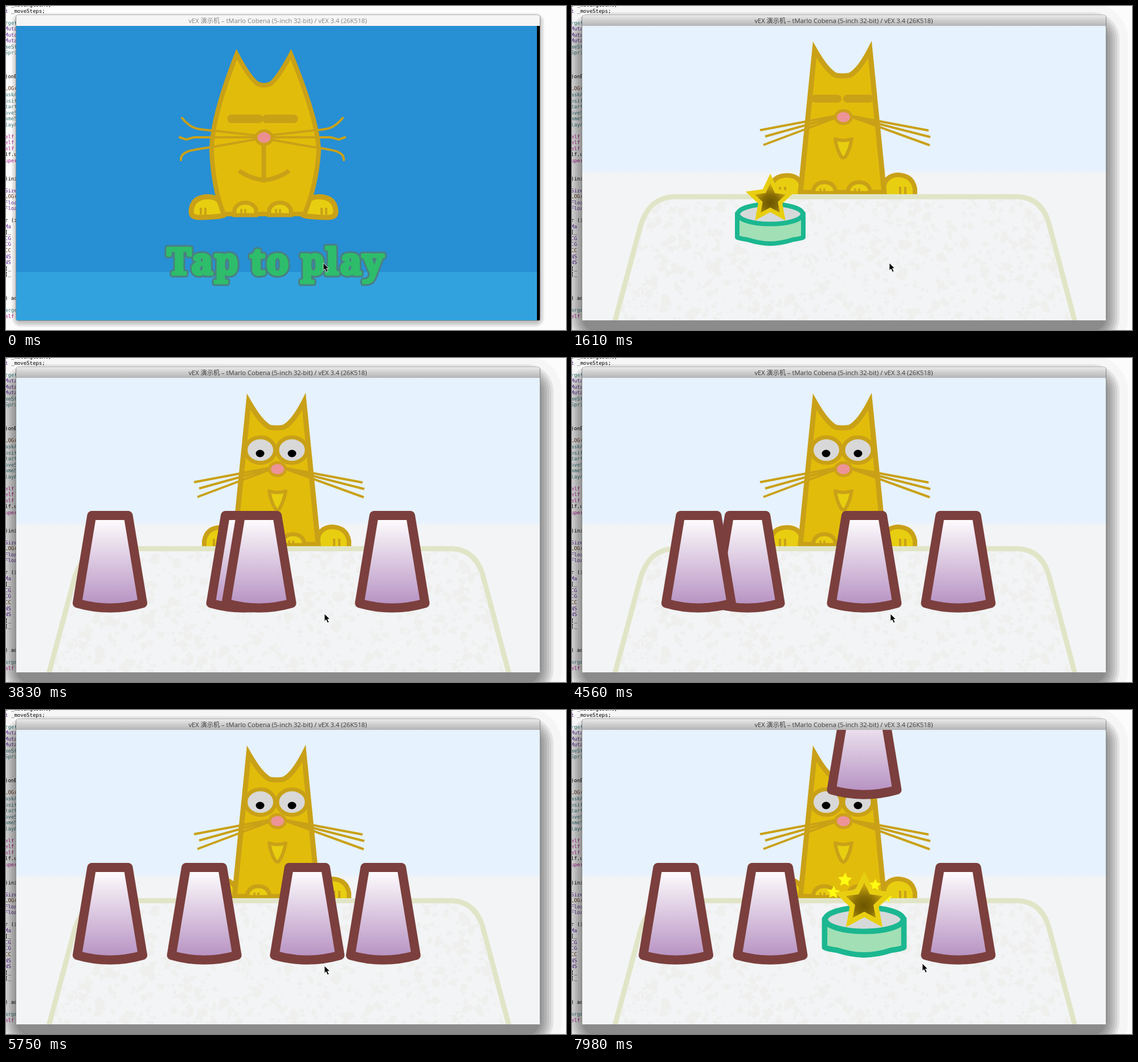
An HTML page for the animation above (8000 ms loop, 983 by 570 pixels).

```html
<!DOCTYPE html>
<html lang="en">
<head>
<meta charset="utf-8">
<title>Cup shuffle</title>
<style>
html, body { margin: 0; width: 100%; height: 100%; overflow: hidden; background: #fcfcfc; }
svg { display: block; width: 983px; height: 570px; }
.code { font: 9px "DejaVu Sans Mono", monospace; white-space: pre; }
.bar { font: 11.2px "Open Sans", "Noto Sans CJK SC", "Noto Sans CJK", sans-serif; text-anchor: middle; }
.tap { font: 900 64px "Noto Serif", serif; letter-spacing: 2.4px; text-anchor: middle; stroke-linejoin: round; }
.line { fill: none; stroke: #c9a117; }
.body { fill: #e2bc0b; stroke: #c9a117; }
.paw { fill: #e8ce10; stroke: #c9a117; }
.dish { stroke: #1bb790; stroke-width: 8; stroke-linejoin: round; }
</style>
</head>
<body>
<svg viewBox="0 0 983 570">
  <defs>
    <clipPath id="view"><rect x="18" y="35" width="919" height="518"/></clipPath>
    <clipPath id="top"><rect x="300" y="35" width="360" height="296"/></clipPath>
    <clipPath id="desk"><path d="M80 553 L123 392 Q136 341 180 340 H782 Q824 342 835 390 L878 553Z"/></clipPath>
    <linearGradient id="sky" x2="0" y2="1">
      <stop offset=".966" stop-color="#e6f2fe"/><stop offset="1" stop-color="#f3f4f5"/>
    </linearGradient>
    <linearGradient id="chrome" x2="0" y2="1">
      <stop stop-color="#e9e9e9"/><stop offset="1" stop-color="#b4b4b4"/>
    </linearGradient>
    <linearGradient id="glass" gradientUnits="userSpaceOnUse" x1="0" y1="285" x2="0" y2="430">
      <stop stop-color="#fdfbfd"/><stop offset="1" stop-color="#b995c4"/>
    </linearGradient>
    <radialGradient id="gold" gradientUnits="userSpaceOnUse" cx="0" cy="346" r="30">
      <stop stop-color="#6b5500"/><stop offset=".45" stop-color="#856b04"/><stop offset="1" stop-color="#c9a60d"/>
    </radialGradient>
    <g id="cup">
      <path d="M-32 277 H32 L57.5 431.5 Q0 448 -57.5 431.5Z" fill="url(#glass)"
        stroke="#7b3f3d" stroke-width="16" stroke-linejoin="round"/>
    </g>
    <g id="titleSide">
      <path class="paw" stroke-width="9" d="M325 362 Q326 336 355 335.5 Q374 336 380 352 L384 367 Q382 371 340 372 Q325 372 325 362Z"/>
      <path class="line" stroke-width="4" d="M342 355 V367 M350 355 V367"/>
    </g>
    <g id="whisker">
      <path class="line" stroke-width="4" stroke-linecap="round" d="M442 228 L362 219 C338 217 326 218 309 197
        M442 231 L330 231 L316 235 L305 231 M442 234 L362 248 C330 253 306 254 307 271"/>
    </g>
  </defs>
  <rect width="983" height="570" fill="#fcfcfc"/>
  <g id="code" class="code"></g>
  <g id="dimShadow"></g>
  <g id="deepShadow"></g>
  <rect x="17.5" y="16" width="920" height="537.5" rx="4" fill="#f3f4f5" stroke="#8a8a8a"/>
  <path id="bar" d="M18 35 V20 Q18 16 22 16 H933 Q937 16 937 20 V35Z"/>
  <text id="barText" class="bar" x="477" y="30">vEX 演示机 – tMarlo Cobena (5-inch 32-bit) / vEX 3.4 (26K518)</text>

  <g id="title" clip-path="url(#view)">
    <rect x="18" y="35" width="919" height="518"/>
    <rect x="18" y="35" width="914" height="433" fill="#278fd4"/>
    <rect x="18" y="468" width="914" height="85" fill="#31a2de"/>
    <use href="#titleSide"/>
    <use href="#titleSide" transform="matrix(-1 0 0 1 904 0)"/>
    <path class="body" stroke-width="8" stroke-miterlimit="9" d="M405 85 Q361 197 361 255 Q364 320 382 366 H524
      Q545 315 549 255 Q547 199 500 85 Q480 123 466 136 Q453 143 440 136 Q425 123 405 85Z"/>
    <use href="#whisker"/>
    <use href="#whisker" transform="matrix(-1 0 0 1 900 0)"/>
    <g id="titlePaws"></g>
    <path class="line" stroke-width="15" stroke-linecap="round" d="M396 198.500 H444 M457 198.500 H505"/>
    <path class="line" stroke-width="8" d="M452.500 236 V307 M409 290 Q430 304 453 306.500 Q477 304 497 290"/>
    <ellipse cx="453" cy="231.500" rx="14" ry="12" fill="#ec8f93" stroke="#c9a117" stroke-width="5"/>
    <text class="tap" x="474" y="472" fill="none" stroke="#4b7f82" stroke-width="11">Tap to play</text>
    <text class="tap" x="474" y="472" fill="#2ebd6b" stroke="#2ebd6b" stroke-width="5">Tap to play</text>
  </g>

  <g id="game" clip-path="url(#view)">
    <rect x="18" y="35" width="919" height="518" fill="#f3f4f5"/>
    <rect x="18" y="35" width="919" height="261" fill="url(#sky)"/>
    <g clip-path="url(#top)">
      <path class="paw" stroke-width="8" d="M348 335 V322 Q352 298 378 298 Q402 298 406 325 V335 M602 335 V322 Q598 298 572 297 Q548 298 546 325 V335"/>
      <path class="line" stroke-width="4" d="M365 318 V331 M374 318 V331 M576 318 V331 M585 318 V331"/>
      <path class="body" stroke-width="9" stroke-miterlimit="9" d="M401 328 L426 77 Q447 114 463 122 Q475 124 487 122 Q504 114 523 77 L548 328Z"/>
      <path class="line" stroke-width="4" d="M470 192 L330 218.500 M470 193 L339 229.500 M470 194 L336 244.500
        M482 192 L626 219 M482 193 L629 230.500 M482 192 L628 245"/>
      <g id="gamePaws"></g>
      <g id="open">
        <g fill="#d8d8d8" stroke="#c9a117" stroke-width="7">
          <ellipse cx="446.500" cy="162" rx="26" ry="22.500"/><ellipse cx="502" cy="162" rx="26" ry="22.500"/>
        </g>
        <ellipse cx="446" cy="168" rx="7.500" ry="6.500"/><ellipse cx="502" cy="168" rx="7.500" ry="6.500"/>
      </g>
      <path id="shut" class="line" stroke-width="14" stroke-linecap="round" d="M427 163 H466 M483 163 H522"/>
      <ellipse cx="476.500" cy="195.500" rx="14" ry="11.500" fill="#ec9497" stroke="#cda01c" stroke-width="5"/>
      <path class="paw" stroke-width="6" stroke-linejoin="round" d="M462 234 Q476 239 491 234 Q488 252 480 265 Q476 270 472 264 Q464 250 462 234Z"/>
    </g>
    <path d="M75 556 L119 392 Q133 337 180 335.500 H782 Q827 337 839 390 L883 556" fill="#f2f4f5" stroke="#e1e5c7" stroke-width="9"/>
    <path id="grain" clip-path="url(#desk)" fill="#efefee"/>
    <g id="sparks" fill="#fffb12"></g>
    <g id="prize">
      <path class="dish" fill="#a2dfb5" d="M-58 365 V407 Q-54 409 -40 411 Q-18 418 0 418 Q18 418 40 411 Q54 409 58 407 V365Z"/>
      <ellipse class="dish" cx="0" cy="366" rx="57" ry="17.500" fill="#d6d9da"/>
      <path id="rim" fill="#e8ce10"/>
      <path id="core" fill="url(#gold)"/>
    </g>
    <g id="cups"></g>
  </g>
  <path id="pointer" d="M0 0 V13 L3 10.500 L5.500 16 L8 15 L5.500 9.500 H9.500Z" stroke="#fff" stroke-width=".8"/>
</svg>
<script>
const LOOP = 8000, STEP = 147.5;
const SLOTS = [182.5, 348, 513, 678];
const $ = id => document.getElementById(id);
const clamp = v => Math.max(0, Math.min(1, v));
const span = (t, a, b) => clamp((t - a) / (b - a));
const show = (el, on) => el.setAttribute('display', on ? 'inline' : 'none');
const place = (el, x, y, more = '') => el.setAttribute('transform', `translate(${x} ${y}) ${more}`);

function add(parent, tag, attrs) {
  const el = document.createElementNS('http://www.w3.org/2000/svg', tag);
  for (const k in attrs) el.setAttribute(k, attrs[k]);
  parent.append(el);
  return el;
}

function star(cx, cy, r, ratio = 0.49) {
  let d = '';
  for (let i = 0; i < 10; i++) {
    const a = i * Math.PI / 5, q = i % 2 ? r * ratio : r;
    d += `${i ? 'L' : 'M'}${(cx + q * Math.sin(a)).toFixed(1)} ${(cy - q * Math.cos(a)).toFixed(1)}`;
  }
  return d + 'Z';
}

// Slice of an editor behind the window; one entry per row, first letter is the colour
const INK = { t: '#3f7f83', p: '#5c2699', k: '#000', b: '#643820', m: '#b01c92' };
const ROWS = 'trget|pMuta|pMuta|pMuta|tmeSt|tSpri||||k)onE||bLOG(|taskA|tosit|ttart|toveS|tameS|tlayA||melf|melf|melf|klf.u|muper|||k)ini||pSize|bLOG(|pFloa|pFloa||kr (i|p  Ma|k  [_|p  CG|p  CG|b  CC|p  NS|p  NS|k  [_|k  [_||||k) ad||targe|melf';
function codeLine(text, y, color, x = -2) {
  add($('code'), 'text', { x, y, fill: color }).textContent = text;
}
ROWS.split('|').forEach((row, i) => row && codeLine(row.slice(1), 32.5 + i * 10.54, INK[row[0]]));
codeLine('t', 1, INK.p);
codeLine('_movingCount;', 1, INK.k, 9);
codeLine('t', 11.500, INK.p);
codeLine('_moveSteps;', 11.500, INK.k, 9);

function shadow(group, layers, grow, step, drop, alpha, round) {
  for (let i = 0; i < layers; i++) {
    const g = grow - i * step;
    add(group, 'rect', { x: 18 - g, y: 16 + drop - g, width: 919 + 2 * g, height: 537 + 2 * g,
      rx: g + round, opacity: alpha });
  }
}
shadow($('dimShadow'), 5, 8, 2, 4, 0.05, 8);
shadow($('deepShadow'), 1, 39, 0, 19, 0.025, 24);
shadow($('deepShadow'), 7, 24, 4, 19, 0.078, 24);

function paws(group, xs, top, base) {
  for (const x of xs) {
    add(group, 'path', { class: 'paw', 'stroke-width': 7, d:
      `M${x - 19} ${base} V${top + 16} Q${x - 14} ${top + 4} ${x} ${top + 4} Q${x + 14} ${top + 4} ${x + 19} ${top + 16} V${base}Z` });
    add(group, 'path', { class: 'line', 'stroke-width': 3.5, d:
      `M${x - 7} ${top + 15} V${base} M${x} ${top + 15} V${base}` });
  }
}
paws($('titlePaws'), [420, 481], 342, 368);
paws($('gamePaws'), [443, 504], 306, 329);

let seed = 11;
const rand = () => (seed = seed * 16807 % 2147483647) / 2147483647;
let grain = '';
for (let i = 0; i < 1000; i++) {
  const x = 80 + rand() * 800, y = 338 + rand() * 216, r = 2 + rand() * rand() * 11;
  for (let k = 0; k < 8; k++) {
    const a = k * Math.PI / 4, q = r * (0.3 + rand());
    grain += `${k ? 'L' : 'M'}${(x + q * Math.cos(a)).toFixed(0)} ${(y + q * Math.sin(a)).toFixed(0)}`;
  }
  grain += 'Z';
}
$('grain').setAttribute('d', grain);

$('rim').setAttribute('d', star(0, 340.5, 45.5));
$('core').setAttribute('d', star(0, 340.5, 28.5));

const cups = SLOTS.map(() => add($('cups'), 'use', { href: '#cup' }));
const sparks = [[-34, -31, 13], [-54, -9, 12], [19, -22, 11], [40, 0, 9]].map(([dx, dy, r]) =>
  ({ dx, dy, el: add($('sparks'), 'path', { d: star(0, 0, r) }) }));

// Each swap exchanges two slots, one after the other
const SWAPS = [[1, 2], [0, 1], [2, 3], [2, 3]], SWAP_AT = 3605, SWAP_MS = 550;
function cupPlaces(t) {
  const order = [0, 1, 2, 3], xs = [...SLOTS];
  SWAPS.forEach(([a, b], i) => {
    const p = clamp((t - SWAP_AT) / SWAP_MS - i), d = (SLOTS[b] - SLOTS[a]) * p;
    if (p === 0) return;
    xs[order[a]] = SLOTS[a] + d;
    xs[order[b]] = SLOTS[b] - d;
    [order[a], order[b]] = [order[b], order[a]];
  });
  return { xs, order };
}

const PATH = [[0, 557, 452], [2360, 557, 452], [2790, 559, 450], [6190, 559, 450], [6500, 626, 380],
  [6800, 626, 380], [7220, 522, 449], [7500, 522, 449], [7965, 615, 446]];
function pointerAt(t) {
  let i = 0;
  while (i < PATH.length - 2 && t >= PATH[i + 1][0]) i++;
  const [a, x, y] = PATH[i], [b, u, v] = PATH[i + 1], p = span(t, a, b);
  return [x + (u - x) * p, y + (v - y) * p];
}

function draw(t) {
  const focus = t > 100, playing = t > 280;
  show($('title'), !playing);
  show($('game'), playing);
  show($('dimShadow'), !focus);
  show($('deepShadow'), focus);
  $('bar').setAttribute('fill', focus ? 'url(#chrome)' : '#f5f5f5');
  $('barText').setAttribute('fill', focus ? '#3c3c3c' : '#858585');

  const blink = (t > 1600 && t < 1900) || (t > 3520 && t < 3820);
  show($('open'), !blink);
  show($('shut'), blink);

  const revealed = t > 7450;
  show($('prize'), t < 3300 || revealed);
  if (revealed) {
    const s = 1 + 0.2 * span(t, 7480, 7965);
    place($('prize'), SLOTS[2], 359.5, `scale(${s}) translate(0 -358.5)`);
  } else {
    const high = Math.max(0, 985 - t) * 0.568;
    place($('prize'), SLOTS[1] + high * 0.45, -high);
  }

  const { xs, order } = cupPlaces(t);
  const fall = -419 * (1 - span(t, 2800, 3340));
  const hop = span(t, 6490, 7240);
  cups.forEach((cup, i) => {
    let y = fall;
    if (i === order[3]) y -= 4 * 133 * hop * (1 - hop);
    if (i === order[2]) y -= 0.6 * Math.max(0, t - 7480);
    place(cup, xs[i], y);
  });

  const burst = span(t, 7500, 7965);
  show($('sparks'), burst > 0);
  for (const s of sparks) place(s.el, SLOTS[2] + s.dx * burst, 330 + s.dy * burst, `rotate(${12 * burst - 8})`);

  place($('pointer'), ...pointerAt(t));
}

function tick() {
  const t = performance.now() % LOOP;
  draw(Math.floor((t + 13) / STEP) * STEP);
  requestAnimationFrame(tick);
}
tick();
</script>
</body>
</html>
```
